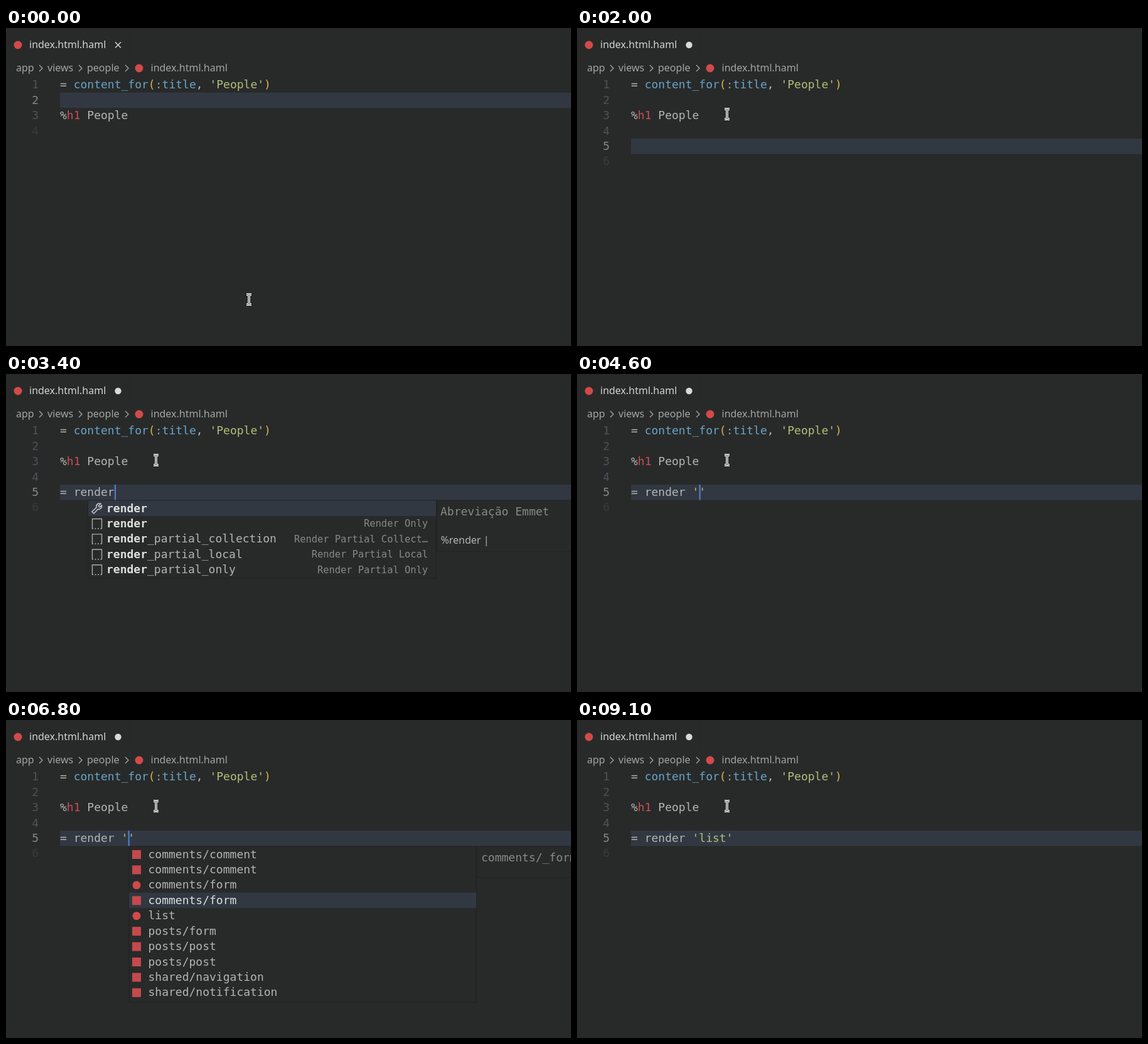
An HTML page with a canvas that plays this animation: 900x506 px, repeating every 9.2 s.

```html
<!DOCTYPE html>
<html lang="en">
<head>
<meta charset="utf-8">
<title>Editor autocomplete</title>
<style>
  html, body { margin: 0; width: 100%; height: 100%; overflow: hidden; background: #282a29; }
  canvas { display: block; width: 900px; height: 506px; }
</style>
</head>
<body>
<canvas id="stage" width="900" height="506"></canvas>
<script>
const ctx = document.getElementById('stage').getContext('2d');
const LOOP = 9200, CHAR = 10.836, LINE = 24.43, LEFT = 86, TOP = 78.3, POPUP_TOP = 201.5;
const MONO = '"DejaVu Sans Mono", monospace', SANS = '"Noto Sans", sans-serif';
const C = {
  bg: '#282a29', row: '#323842', edge: '#222426', text: '#b2b5b3', bright: '#dcdfde',
  muted: '#868a89', number: '#4d5259', active: '#82878d', dim: '#373b3f',
  blue: '#69a3c9', yellow: '#d8b44c', green: '#b4bd78', red: '#cb4d57', logo: '#d24a4a', caret: '#5284d8'
};

// Each timeline lists [start, value]; the latest started value applies.
const typed = [[0, ''], [2500, '='], [2600, '= '], [2800, '= r'], [2900, '= re'], [3000, '= ren'],
  [3100, '= rend'], [3300, '= rende'], [3400, '= render'], [3600, '= render '],
  [4400, "= render ''"], [8900, "= render 'list'"]];
const activeLine = [[0, 2], [1000, 3], [1100, 4], [1400, 5]];
const lineCount = [[0, 4], [1100, 5], [1400, 6]];
const caretOn = [[0, false], [1000, true], [1900, false], [2400, true], [3900, false], [4400, true],
  [4900, false], [5400, true], [5900, false], [6400, true], [7100, false], [7600, true],
  [8100, false], [8600, true], [9100, false]];
const picked = [[0, -1], [4900, 0], [5100, 1], [5200, 2], [5300, 3], [5400, 4], [5900, 5], [6300, 4],
  [6700, 3], [7000, 2], [7400, 1], [7900, 2], [8100, 3], [8400, 4], [8900, -1]];

const snippets = [
  ['render', 'Render Only'], ['render_partial_collection', 'Render Partial Collect…'],
  ['render_partial_local', 'Render Partial Local'], ['render_partial_only', 'Render Partial Only'],
  ['reset_cycle', 'Reset Cycle'], ['range_field', 'Range Field'], ['range_field_tag', 'Range Field Tag'],
  ['f.range_field', 'Form: Range Field'], ['radio_button', 'Radio Button'],
  ['radio_button_tag', 'Radio Button Tag'], ['f.radio_button', 'Form: Radio Button']
];
const partials = ['comments/comment', 'comments/comment', 'comments/form', 'comments/form', 'list',
  'posts/form', 'posts/post', 'posts/post', 'shared/navigation', 'shared/notification'];
const isHaml = i => i === 2 || i === 4;

const at = (steps, t) => steps.filter(([start]) => start <= t).pop()[1];
const lineTop = n => TOP + LINE * (n - 1);

function text(str, x, y, color = C.text, font = '18px ' + MONO, align = 'left') {
  ctx.font = font;
  ctx.fillStyle = color;
  ctx.textAlign = align;
  ctx.fillText(str, x, y);
}
function box(x, y, w, h, color) {
  ctx.fillStyle = color;
  ctx.fillRect(x, y, w, h);
}
function stroke(path, color, width = 1.4, dash = []) {
  ctx.strokeStyle = color;
  ctx.lineWidth = width;
  ctx.setLineDash(dash);
  ctx.stroke(new Path2D(path));
}
function disc(x, y, r, color) {
  ctx.fillStyle = color;
  ctx.beginPath();
  ctx.arc(x, y, r, 0, 7);
  ctx.fill();
}
// Runs are [string, color] pairs laid out on the character grid.
function code(n, ...runs) {
  let col = 0;
  for (const [str, color] of runs) {
    text(str, LEFT + col * CHAR, lineTop(n) + 18, color);
    col += str.length;
  }
}
function panel(x, y, w, h) {
  box(x, y, w, h, C.bg);
  ctx.setLineDash([]);
  ctx.strokeStyle = C.edge;
  ctx.lineWidth = 1.5;
  ctx.strokeRect(x, y, w, h);
}

function header(dirty) {
  const ui = (str, x, y, color) => text(str, x, y, color, '16px ' + SANS);
  box(196, 0, 1, 48, '#242626');
  disc(19, 27, 6.5, C.logo);
  ui('index.html.haml', 37, 32, '#d2d4d3');
  if (dirty) disc(178.5, 27, 5.2, '#d8dad9');
  else stroke('M174 22.5l9 9m0-9l-9 9', '#d0d2d1', 1.5);
  [['app', 16], ['views', 66], ['people', 129], ['index.html.haml', 230.5]]
    .forEach(([str, x]) => ui(str, x, 69, '#a2a5a4'));
  for (const x of [53, 116, 190]) stroke(`M${x} 59l5 5l-5 5`, '#a2a5a4');
  disc(212, 64, 6.5, C.logo);
}

function editor(t, line) {
  const current = at(activeLine, t), count = at(lineCount, t);
  box(LEFT, lineTop(current), 900 - LEFT, LINE, C.row);
  for (let n = 1; n <= count; n++) {
    const color = n === current ? C.active : n === count ? C.dim : C.number;
    text(n, 52, lineTop(n) + 18, color, '18px ' + MONO, 'right');
  }
  code(1, ['= ', C.text], ['content_for', C.blue], ['(', C.yellow], [':', '#92958a'], ['title', C.blue],
    [', ', C.text], ["'People'", C.green], [')', C.yellow]);
  code(3, ['%', C.text], ['h1', C.red], [' People', C.text]);
  code(5, [line.slice(0, 9), C.text], [line.slice(9), C.green]);
  if (at(caretOn, t)) {
    const col = current === 3 ? 10 : current < 5 ? 0 : line.length - line.endsWith("'");
    box(LEFT + col * CHAR + 0.3, lineTop(current), 2, LINE, C.caret);
  }
}

// Indices of the query's letters inside the label, or null when it does not match.
function match(label, query) {
  const hits = [];
  for (const letter of query) {
    const i = label.indexOf(letter, hits.length ? hits.at(-1) + 1 : 0);
    if (i < 0) return null;
    hits.push(i);
  }
  return hits;
}

function snippetPopup(query) {
  const rows = [[query, ''], ...snippets].filter(([label]) => match(label, query));
  panel(131, POPUP_TOP, 554, rows.length * LINE + 1.5);
  box(131, POPUP_TOP, 554, LINE, C.row);
  rows.forEach(([label, detail], i) => {
    const y = POPUP_TOP + i * LINE;
    if (i) {
      stroke(`M137.5 ${y + 20}v-15.5h15v15.5`, '#a9acab');
      stroke(`M137 ${y + 20}h16`, '#a9acab', 1.5, [2, 2.5]);
    } else {
      stroke(`M151 ${y + 5}a5 5 0 0 0 -7 6l-7 6.5l3 3l6.500 -7a5 5 0 0 0 6 -6l-3.500 3l-2-2z`, '#c9cccb', 1.5);
    }
    const hits = match(label, query);
    [...label].forEach((ch, k) => {
      const hit = hits.includes(k);
      text(ch, 160 + k * CHAR, y + 18, hit ? C.bright : C.text, (hit ? 'bold ' : '') + '18px ' + MONO);
    });
    text(detail, 672, y + 17.5, C.muted, '15.4px ' + MONO, 'right');
  });
  panel(686, POPUP_TOP, 220, 81);
  text('Abreviação Emmet', 692, 224.5, C.muted);
  text(`%${query} |`, 692.5, 270, C.text, '16px ' + SANS);
}

function partialPopup(selected) {
  panel(196, POPUP_TOP, 553, partials.length * LINE + 3);
  box(196, POPUP_TOP + selected * LINE, 553, LINE, C.row);
  partials.forEach((label, i) => {
    const y = POPUP_TOP + i * LINE;
    if (isHaml(i)) disc(208, y + 12.5, 6.5, C.logo);
    else box(201, y + 5.5, 14, 14, '#c4494d');
    text(label, 226.500, y + 18, i === selected ? C.bright : C.text);
  });
  panel(750, POPUP_TOP, 160, 49);
  const label = partials[selected];
  const path = label.includes('/') ? label.replace('/', '/_') : 'people/_' + label;
  text(path + (isHaml(selected) ? '.html.haml' : '.html.erb'), 757, 224.5, C.muted);
}

function pointer(t) {
  const p = Math.min(1, Math.max(0, t / 900)), ease = p * p * (3 - 2 * p);
  const x = 387 - 148 * ease, y = 432 - 295 * ease;
  const beam = `M${x - 4} ${y - 8}h2.500l1.500 1.500l1.500-1.500h2.500M${x} ${y - 6.5}v13`
    + `M${x - 4} ${y + 8}h2.500l1.500-1.500l1.500 1.500h2.500`;
  stroke(beam, '#e9ebea', 3.8);
  stroke(beam, '#3a3c3c', 1);
}

function draw() {
  const t = Math.floor(performance.now() % LOOP / 100) * 100;
  const line = at(typed, t), selected = at(picked, t);
  box(0, 0, 900, 506, C.bg);
  header(t >= 1100);
  editor(t, line);
  const query = /^= (r\w*)$/.exec(line);
  if (query) snippetPopup(query[1]);
  if (selected >= 0) partialPopup(selected);
  pointer(t);
  requestAnimationFrame(draw);
}
draw();
</script>
</body>
</html>
```
